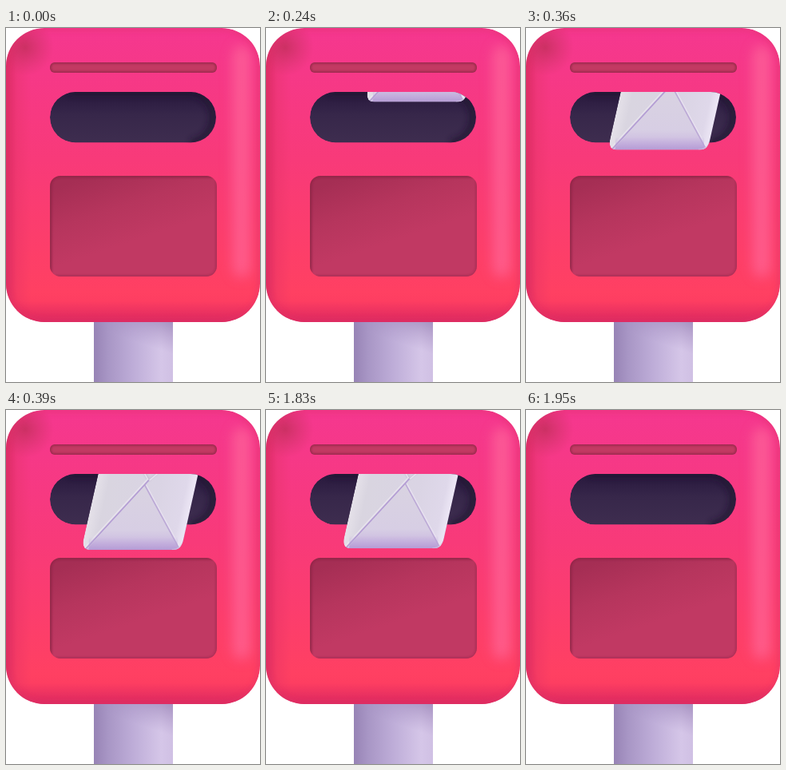
Animation, 318 px wide and 443 px high, one loop 2.4 s. Source, as an HTML page:

```html
<!DOCTYPE html>
<html lang="en">
<head>
<meta charset="utf-8">
<title>Mailbox</title>
<style>
html, body { margin: 0; width: 100%; height: 100%; overflow: hidden; background: #fff; }
svg { display: block; width: 318px; height: 443px; }
</style>
</head>
<body>
<svg viewBox="0 0 318 443">
  <defs>
    <linearGradient id="body" x2="0" y2="1">
      <stop offset="0" stop-color="#f5378f"/>
      <stop offset=".45" stop-color="#f83a79"/>
      <stop offset=".9" stop-color="#ff4062"/>
      <stop offset="1" stop-color="#f93860"/>
    </linearGradient>
    <linearGradient id="side">
      <stop offset="0" stop-color="#d82a60" stop-opacity=".85"/>
      <stop offset=".45" stop-color="#e03064" stop-opacity=".32"/>
      <stop offset="1" stop-color="#e03064" stop-opacity="0"/>
    </linearGradient>
    <linearGradient id="foot" x2="0" y2="1">
      <stop offset="0" stop-color="#d92860" stop-opacity="0"/>
      <stop offset="1" stop-color="#d92860" stop-opacity=".9"/>
    </linearGradient>
    <radialGradient id="corner">
      <stop offset="0" stop-color="#c02e58" stop-opacity=".75"/>
      <stop offset="1" stop-color="#c83260" stop-opacity="0"/>
    </radialGradient>
    <linearGradient id="post">
      <stop offset="0" stop-color="#9783b5"/>
      <stop offset=".18" stop-color="#a896c5"/>
      <stop offset=".5" stop-color="#beadd8"/>
      <stop offset=".85" stop-color="#d5c6e8"/>
      <stop offset="1" stop-color="#d0c0e4"/>
    </linearGradient>
    <linearGradient id="postShade" gradientUnits="userSpaceOnUse" x1="190" y1="362" x2="178" y2="398">
      <stop offset="0" stop-color="#9a84b6" stop-opacity=".75"/>
      <stop offset="1" stop-color="#a792c4" stop-opacity="0"/>
    </linearGradient>
    <linearGradient id="hole" x2="0" y2="1">
      <stop offset="0" stop-color="#28183d"/>
      <stop offset=".45" stop-color="#37274a"/>
      <stop offset="1" stop-color="#3e2d4f"/>
    </linearGradient>
    <linearGradient id="panel" gradientUnits="userSpaceOnUse" x1="120" y1="180" x2="150" y2="270">
      <stop offset="0" stop-color="#a52e54"/>
      <stop offset=".5" stop-color="#b6355d"/>
      <stop offset="1" stop-color="#c13963"/>
    </linearGradient>
    <linearGradient id="paper" gradientUnits="userSpaceOnUse" x1="92" y1="150" x2="218" y2="178">
      <stop offset="0" stop-color="#e5e1e9"/>
      <stop offset=".12" stop-color="#d9d5e0"/>
      <stop offset=".6" stop-color="#dad4e4"/>
      <stop offset=".86" stop-color="#dfd8ea"/>
      <stop offset=".94" stop-color="#ece6f5"/>
      <stop offset="1" stop-color="#e3dbee"/>
    </linearGradient>
    <linearGradient id="flap" x2="0" y2="1">
      <stop offset="0" stop-color="#cdc5d5"/>
      <stop offset="1" stop-color="#d8d1e0"/>
    </linearGradient>
    <linearGradient id="front" gradientUnits="userSpaceOnUse" x1="0" y1="148" x2="0" y2="229">
      <stop offset="0" stop-color="#d9d3e1"/>
      <stop offset=".7" stop-color="#d7cee4"/>
      <stop offset="1" stop-color="#c6b1de"/>
    </linearGradient>
    <linearGradient id="hem" gradientUnits="userSpaceOnUse" x1="0" y1="213" x2="0" y2="229">
      <stop offset="0" stop-color="#bda5dc" stop-opacity="0"/>
      <stop offset="1" stop-color="#b298d3" stop-opacity=".85"/>
    </linearGradient>
    <filter id="b1" x="-30%" y="-30%" width="160%" height="160%"><feGaussianBlur stdDeviation="1.2"/></filter>
    <filter id="b3" x="-30%" y="-30%" width="160%" height="160%"><feGaussianBlur stdDeviation="3.5"/></filter>
    <filter id="b8" x="-150%" y="-30%" width="400%" height="160%"><feGaussianBlur stdDeviation="8"/></filter>
    <clipPath id="boxClip"><rect id="boxShape" width="318" height="368" rx="48"/></clipPath>
    <clipPath id="barClip"><rect id="barShape" x="55" y="43" width="209" height="13" rx="6"/></clipPath>
    <clipPath id="slotClip"><rect id="slotShape" x="55" y="80" width="208" height="63.5" rx="31.75"/></clipPath>
    <clipPath id="panelClip"><rect id="panelShape" x="55" y="185" width="209" height="126" rx="13"/></clipPath>
    <clipPath id="mouth"><path d="M55 112A32 32 0 0 1 87 80H231A32 32 0 0 1 263 112V320H55Z"/></clipPath>
    <clipPath id="sheet"><path id="sheetShape" d="M110.200 70L77.500 215C75.500 224 78 229 86 229H189C197 229 200.500 225 202.500 216L235.300 70Z"/></clipPath>
  </defs>

  <rect x="110" y="340" width="99" height="103" fill="url(#post)"/>
  <rect x="110" y="340" width="99" height="103" fill="url(#postShade)"/>

  <g clip-path="url(#boxClip)">
    <use href="#boxShape" fill="url(#body)"/>
    <rect x="284" y="22" width="22" height="290" rx="11" fill="#ff6a9c" opacity=".7" filter="url(#b8)"/>
    <rect width="32" height="368" fill="url(#side)"/>
    <rect y="342" width="318" height="26" fill="url(#foot)"/>
    <circle cx="24" cy="24" r="36" fill="url(#corner)"/>
    <use href="#boxShape" fill="none" stroke="#e03068" stroke-width="5" opacity=".55" filter="url(#b3)"/>
  </g>

  <g clip-path="url(#barClip)">
    <use href="#barShape" fill="#c23a62"/>
    <use href="#barShape" fill="none" stroke="#9c2a4e" stroke-width="3.500" filter="url(#b1)"/>
  </g>

  <g clip-path="url(#slotClip)">
    <use href="#slotShape" fill="url(#hole)"/>
    <path d="M80 80H231A32 32 0 0 1 231 143.500" fill="none" stroke="#211233" stroke-width="9" opacity=".75" filter="url(#b3)"/>
  </g>

  <g clip-path="url(#panelClip)">
    <use href="#panelShape" fill="url(#panel)"/>
    <path d="M55 311V198Q55 185 68 185H264" fill="none" stroke="#8f2546" stroke-width="5" opacity=".8" filter="url(#b1)"/>
    <path d="M264 187V298Q264 311 251 311H62" fill="none" stroke="#a52d52" stroke-width="4" opacity=".75" filter="url(#b1)"/>
    <path d="M260 195V298" stroke="#cf4870" stroke-width="4" opacity=".6" filter="url(#b1)"/>
  </g>

  <g clip-path="url(#mouth)">
    <g id="letter">
      <g clip-path="url(#sheet)">
        <use href="#sheetShape" fill="url(#paper)"/>
        <path d="M119 70L159 142L244 70Z" fill="url(#flap)"/>
        <path d="M81 229L154 148L198 229Z" fill="url(#front)"/>
        <path d="M119 70L159 142" stroke="#bcb1ca" stroke-width="3" opacity=".6" filter="url(#b1)"/>
        <path d="M118 70L158 141" stroke="#ebe7ef" stroke-width="1.300"/>
        <path d="M244 70L159 142" stroke="#c3b8d0" stroke-width="2" opacity=".65" filter="url(#b1)"/>
        <path d="M244 71L160 142" stroke="#ebe6f0" stroke-width="1.200"/>
        <path d="M154 148L198 229" stroke="#bca9d6" stroke-width="1.600"/>
        <path d="M156 148L200 229" stroke="#ebe5f3" stroke-width="1.400" opacity=".7"/>
        <path d="M80 228L159 142" stroke="#b39bd4" stroke-width="1.700"/>
        <path d="M78 227L158 140" stroke="#ebe7f0" stroke-width="1.400" opacity=".8"/>
        <rect x="84" y="211" width="111" height="18" fill="url(#hem)"/>
        <path d="M236 70L203 216Q200 229 188 229" fill="none" stroke="#d3c6e2" stroke-width="2" opacity=".6"/>
      </g>
    </g>
  </g>
</svg>
<script>
const LOOP = 2400, STEP = 30;
const TOP = 79, DROP = 150, SLANT = 0.365;
const letter = document.getElementById("letter");

// Share of the eased path, counted in 30 ms steps
function progress(t) {
  const steps = start => Math.floor((t - start) / STEP) + 1;
  if (t < 180) return 0;
  if (t < 1830) return Math.min(1, steps(180) / 10);
  return Math.max(0, 1 - 0.2075 * steps(1830));
}

function draw(t) {
  const p = progress(t);
  const dy = TOP + DROP * p * p - 229;
  letter.setAttribute("visibility", p > 0 ? "visible" : "hidden");
  letter.setAttribute("transform", `translate(${-dy * SLANT} ${dy})`);
}

let begin;
function tick(now) {
  begin ??= now;
  draw((now - begin) % LOOP);
  requestAnimationFrame(tick);
}
draw(0);
requestAnimationFrame(tick);
</script>
</body>
</html>
```
